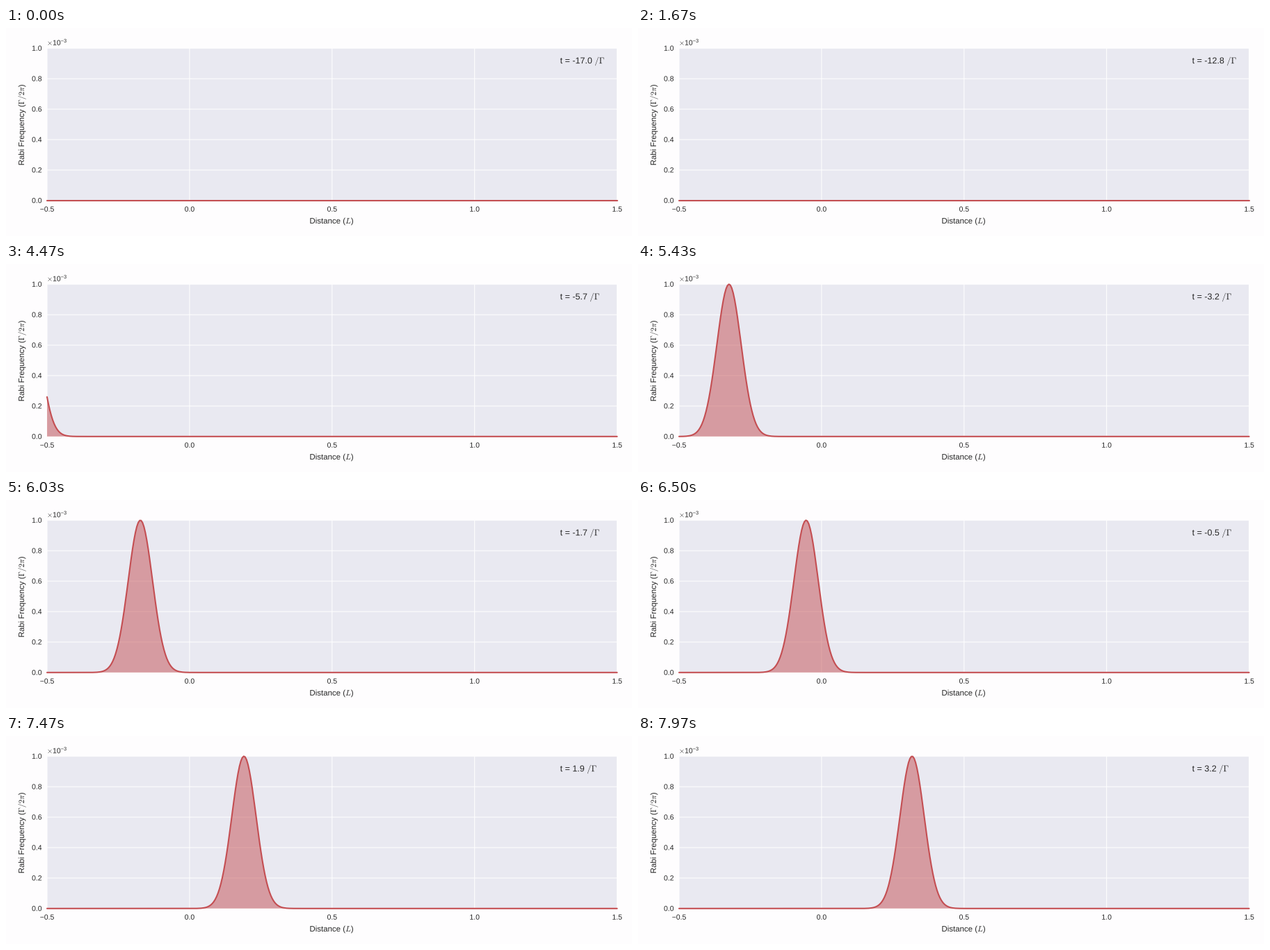
Animation of 900x300 px, one loop 8 s. Source, as a matplotlib script:

```python
import numpy as np
import matplotlib.pyplot as plt
from matplotlib.animation import FuncAnimation
from matplotlib.patheffects import Normal

plt.rcParams.update({
    "font.family": "Liberation Sans",
    "mathtext.fontset": "cm",
    "text.color": "#262626",
    "text.hinting": "none",
})

W, H, DPI = 900, 300, 75
LEFT, RIGHT, TOP, BOTTOM = 59, 878.6, 29.2, 248.8   # plot area in pixels
PAPER, PANEL, RED = "#fefdfe", "#e9e9f1", "#c44e52"

TICK_MS = 20
FRAMES = 400
RATE = 0.03        # simulation steps per millisecond
T_START, T_STEP = -17.02, 0.0845
SPEED = 0.1        # lengths travelled per unit of time
FWHM = 1.0         # pulse duration
PEAK = 1.0         # in units of 1e-3

fig = plt.figure(figsize=(W / DPI, H / DPI), dpi=DPI, facecolor=PAPER)
ax = fig.add_axes([LEFT / W, 1 - BOTTOM / H,
                   (RIGHT - LEFT) / W, (BOTTOM - TOP) / H], facecolor=PANEL)

x_ticks = np.linspace(-0.5, 1.5, 5)
y_ticks = np.linspace(0, 1, 6)
ax.set(xlim=(-0.5, 1.5), ylim=(0, 1), xticks=x_ticks, yticks=y_ticks)
ax.tick_params(length=0, labelleft=False, labelbottom=False)
ax.set_axisbelow(True)
ax.grid(color="white", linewidth=1, linestyle="-", snap=False)
ax.spines[:].set_visible(False)


def label(px, py, text, size=10, ha="center", **kw):
    """Text with its baseline at a pixel position, drawn as smooth outlines."""
    return fig.text(px / W, 1 - py / H, text, size=size, ha=ha, va="baseline",
                    rotation_mode="anchor", path_effects=[Normal()], **kw)


def to_px(x, y):
    return (LEFT + (x + 0.5) / 2 * (RIGHT - LEFT),
            BOTTOM + y * (TOP - BOTTOM))


for x in x_ticks:
    label(to_px(x, 0)[0], 264.7, f"{x:.1f}".replace("-", "\u2212"))
for y in y_ticks:
    label(51.5, to_px(0, y)[1] + 3.5, f"{y:.1f}", ha="right")

label(LEFT, 24.7, r"$\times\mathdefault{10^{-3}}$", ha="left")
label((LEFT + RIGHT) / 2, 282, "Distance ($L$)", 11)
label(26, (TOP + BOTTOM) / 2, r"Rabi Frequency ($\Gamma / 2\pi$)", 11, rotation=90)
clock = label(*to_px(1.3, 0.9), "", 12, ha="left")

z = np.linspace(-0.5, 1.5, 401)
line, = ax.plot(z, 0 * z, color=RED, lw=2, clip_on=False, zorder=3,
                solid_capstyle="round", solid_joinstyle="round")
area, = ax.fill(z, 0 * z, facecolor=RED, alpha=0.5, linewidth=0, zorder=2)


def pulse(t):
    delay = (z / SPEED - t) / FWHM
    return PEAK * np.exp(-4 * np.log(2) * delay ** 2)


def update(i):
    step = round((i + 0.5) * TICK_MS * RATE)
    t = T_START + T_STEP * step
    y = pulse(t)
    line.set_ydata(y)
    area.set_xy(np.column_stack([np.r_[z[0], z, z[-1]], np.r_[0, y, 0]]))
    clock.set_text(rf"t = {t:.1f} $/\Gamma$")
    return line, area, clock


anim = FuncAnimation(fig, update, frames=FRAMES, interval=TICK_MS,
                     repeat=True, repeat_delay=0, blit=False)
plt.show()
```
